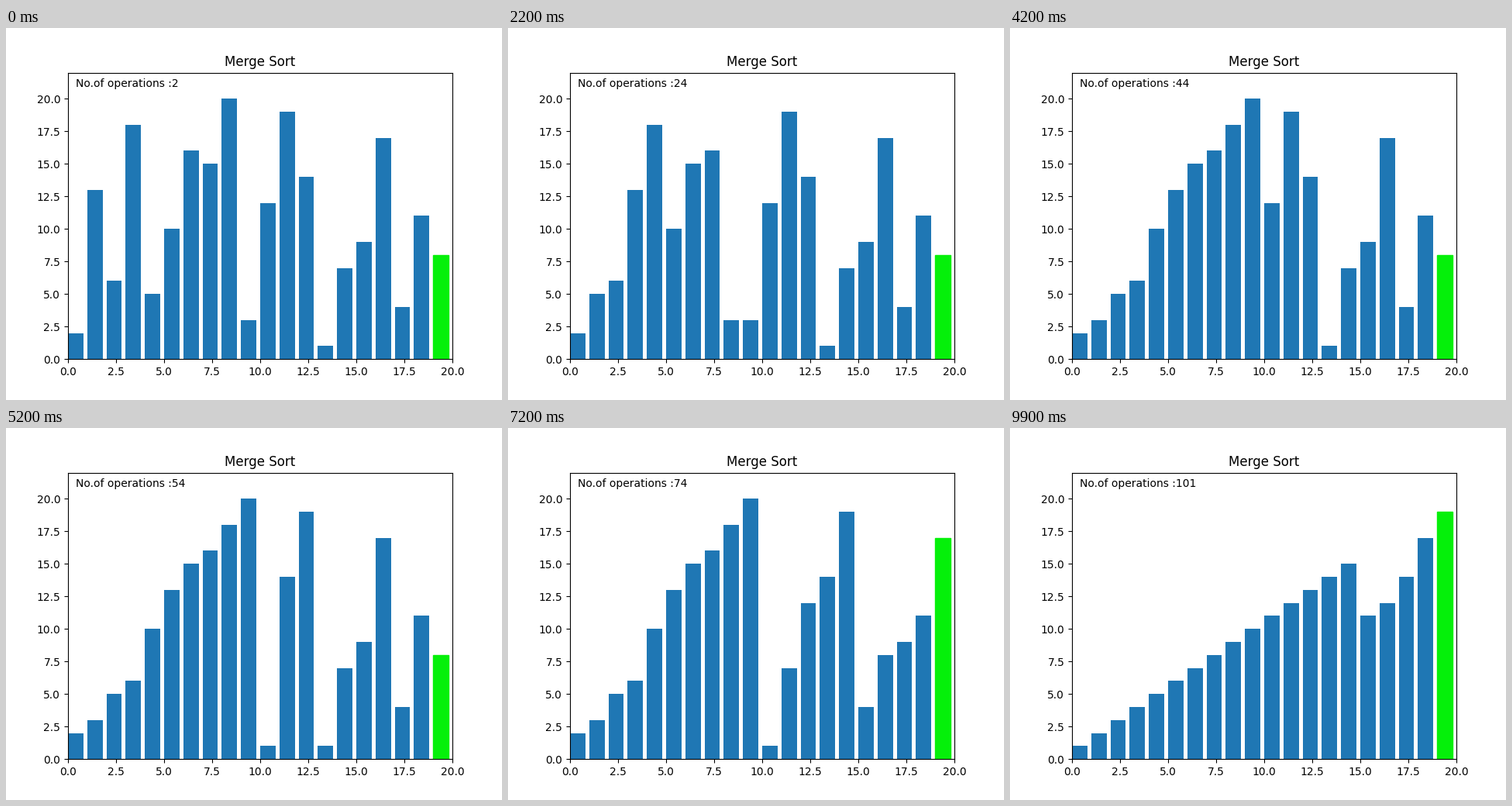
These frames come from a looping animation (640 px wide and 480 px high, 10000 ms). A matplotlib script:

```python
import matplotlib.pyplot as plt
from matplotlib.animation import FuncAnimation

VALUES = [2, 13, 6, 18, 5, 10, 16, 15, 20, 3,
          12, 19, 14, 1, 7, 9, 17, 4, 11, 8]
N = len(VALUES)
FRAMES = 100
INTERVAL = 100


def merge_sort(a, lo, hi):
    """Sort a[lo..hi], yielding after every write and every finished merge."""
    if lo >= hi:
        return
    mid = (lo + hi) // 2
    yield from merge_sort(a, lo, mid)
    yield from merge_sort(a, mid + 1, hi)
    for i, v in enumerate(sorted(a[lo:hi + 1]), lo):
        a[i] = v
        yield a
    yield a


# states[k] is the array after k + 1 operations
states = [list(a) for a in merge_sort(VALUES[:], 0, N - 1)]

plt.rcParams["font.family"] = "DejaVu Sans"
fig, ax = plt.subplots(figsize=(6.4, 4.8), dpi=100)
ax.set_title("Merge Sort")
bars = ax.bar(range(N), VALUES, width=0.8, align="edge", color="#1f77b4")
bars[-1].set_color("#05f00a")
ax.set_xlim(0, N)
ax.set_ylim(0, 1.1 * N)
label = ax.text(0.02, 0.95, "", transform=ax.transAxes)


def update(frame):
    ops = frame + 2
    for bar, h in zip(bars, states[ops - 1]):
        bar.set_height(h)
    label.set_text(f"No.of operations :{ops}")
    return [*bars, label]


anim = FuncAnimation(fig, update, frames=FRAMES, interval=INTERVAL,
                     init_func=lambda: update(0), repeat=True,
                     repeat_delay=0, blit=False)
plt.show()
```
